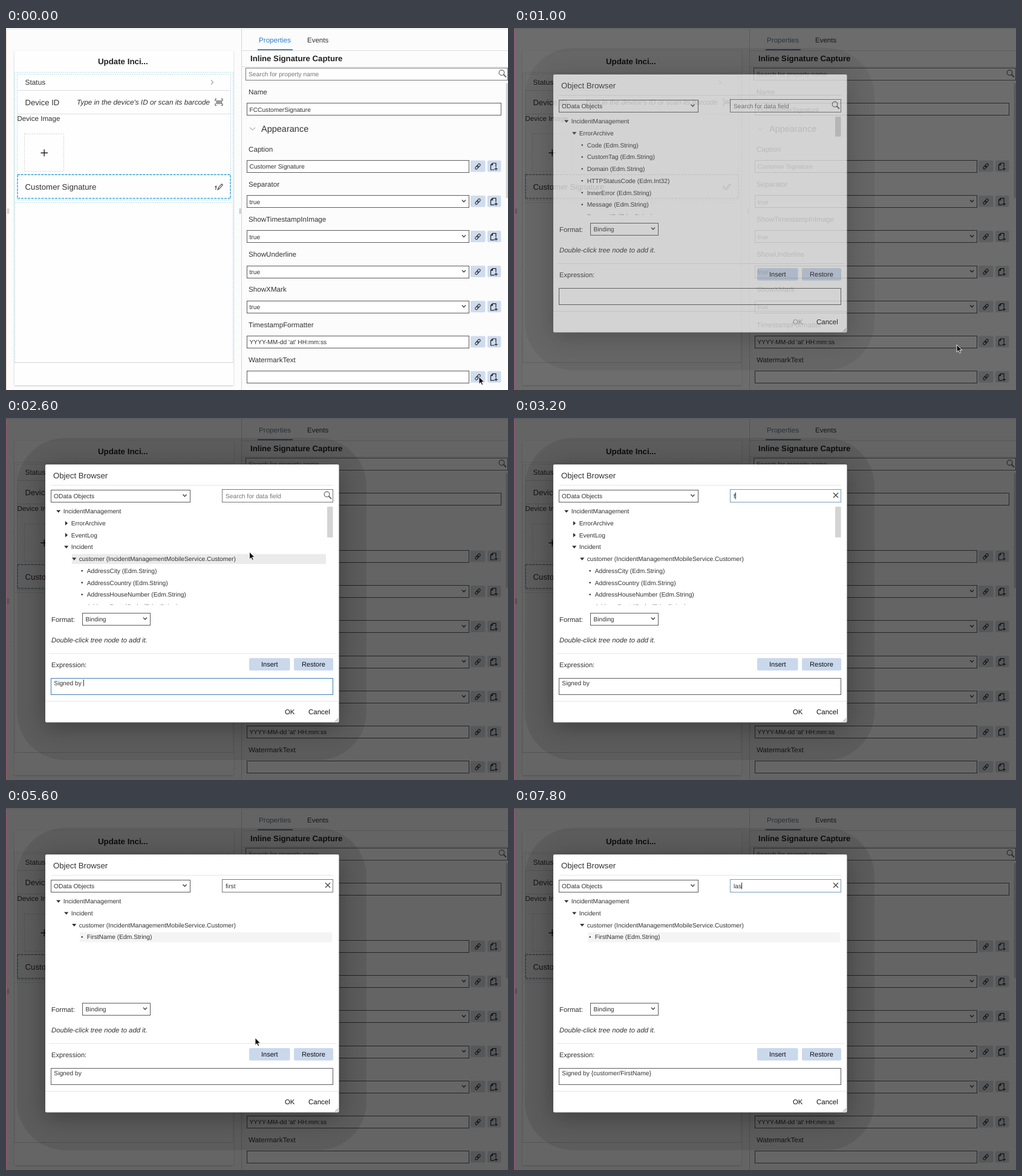
Write an HTML page that moves like this. It is 830x600 px and loops after 8 s.

```html
<!DOCTYPE html>
<html lang="en">
<head>
<meta charset="utf-8">
<title>Object browser</title>
<style>
  html, body { margin: 0; width: 100%; height: 100%; overflow: hidden; background: #fcfcfc; }
  svg { display: block; width: 830px; height: 600px; }
  text { font-family: "Liberation Sans", Arial, sans-serif; white-space: pre; text-rendering: geometricPrecision; }
  .muted { filter: saturate(.25); }
</style>
</head>
<body>
<svg id="stage" viewBox="0 0 830 600">
  <defs>
    <filter id="blur" x="-30%" y="-30%" width="160%" height="160%"><feGaussianBlur stdDeviation="20"/></filter>
    <filter id="soft"><feGaussianBlur stdDeviation="1.6"/></filter>
    <clipPath id="treeClip"><rect x="70" y="145" width="475" height="164.5"/></clipPath>
  </defs>
  <g id="page"></g>
  <rect id="dim" width="830" height="600"/>
  <path id="edge" d="M.5 2V600" stroke-width="1"/>
  <g id="modal"></g>
  <g id="cursor"></g>
</svg>
<script>
const $ = id => document.getElementById(id);
const LOOP = 8000, STEP = 200, SMALL = 10.25;

// y is the middle of the capital letters
const text = (x, y, size, str, fill = '#333', extra = '') =>
  `<text x="${x}" y="${y + size * .36}" font-size="${size}" fill="${fill}" ${extra}>${str}</text>`;
const box = (x, y, w, h, fill = '#fff', stroke = 'none', extra = '') =>
  `<rect x="${x}" y="${y}" width="${w}" height="${h}" fill="${fill}" stroke="${stroke}" ${extra}/>`;
const path = (d, stroke = '#444', width = 1, extra = '') =>
  `<path d="${d}" fill="none" stroke="${stroke}" stroke-width="${width}" ${extra}/>`;
const at = (x, y, content, more = '') => `<g transform="translate(${x} ${y})${more}">${content}</g>`;
const BOLD = 'font-weight="700"', ITALIC = 'font-style="italic"', MIDDLE = 'text-anchor="middle"';

const field = (x, y, w, h = 20, stroke = '#5c5c5c') => box(x + .5, y + .5, w - 1, h - 1, '#fff', stroke);
const caretDown = (x, y) => path(`M${x - 3} ${y - 1.7}l3 3.2 3-3.2`, '#444', 1.4);
const magnifier = (x, y) =>
  `<circle cx="${x}" cy="${y}" r="4.3" fill="none" stroke="#666" stroke-width="1.2"/>` +
  path(`M${x + 3} ${y + 3}l4.5 4.5`, '#666', 1.8);

function linkIcon(x, y, color) {
  const ring = cx => box(cx, -1.9, 6.4, 3.8, 'none', color, 'rx="1.9" stroke-width="1.1"');
  return at(x, y, ring(-5.4) + ring(-1), ' rotate(-48)');
}
function addIcon(x, y) {
  return at(x, y, path('M1.5 5.5H-4.5V-2.5L-1.5-5.5H4V.5M-1.5-5.5V-2.5H-4.5M1.5 4H7M4.2 1.3V6.7', '#222', 1.2));
}
function buttons(y, hot) {
  return box(768, y - 10, 24.5, 19, hot ? '#1870c5' : '#cfdcef', 'none', 'rx="2"') +
    linkIcon(780, y, hot ? '#fff' : '#333') +
    box(796, y - 10, 22.5, 19, '#cfdcef', 'none', 'rx="2"') + addIcon(806, y);
}

function phone() {
  const blue = '#b5dcec', rule = '#dedede';
  let bars = '';
  for (let i = 0; i < 6; i++) bars += `M${-4 + i * 1.7} -3.2V3.2`;
  return box(14, 39, 362, 554, '#aaa', 'none', 'filter="url(#soft)" opacity=".65"') +
    box(14, 38, 362, 554, '#fefefe') +
    text(193.3, 55.6, 13.3, 'Update Inci...', '#222', `${BOLD} ${MIDDLE}`) +
    path('M14.5 554V73.5H375.5V554M14.5 289.5H375.5', blue, 1, 'stroke-dasharray="2 1.5"') +
    path('M18.5 285.5V76.5H371.5V285.5Z', blue, 1, 'stroke-dasharray="2 1.5"') +
    path('M19 103.5H371M19 142.5H371', rule) + path('M14 554.5H376', '#d5d5d5') +
    text(31.5, 90, 11.9, 'Status') + path('M339 86.5l3.6 3.5-3.6 3.5', '#666') +
    text(31.5, 123, 13.1, 'Device ID') +
    text(117, 123, 11.75, "Type in the device's ID or scan its barcode", '#333', ITALIC) +
    at(352, 123, path(bars, '#444', .9) + path('M-4-5.5H-6V-2M4-5.5H6V-2M-4 5.5H-6V2M4 5.5H6V2', '#444', 1)) +
    text(18.5, 150, 11.6, 'Device Image') +
    box(30.5, 175.5, 65, 62, '#fefefe', '#cfcfcf', 'stroke-dasharray="2 2"') +
    path('M57.5 207H69M63.2 201.3V212.7', '#222', 1.4) +
    box(19, 243, 352, 39.5, '#fefefe', '#62b9df', 'stroke-width="1.8" stroke-dasharray="4 1.6"') +
    text(31.5, 263, 13.25, 'Customer Signature') +
    path('M350 268l1.2-3.3 5.3-6.2 1.8 1.6-5.4 6.2zM345.5 263.5l2-1.5v2.5l-1 3.5', '#444', 1.1);
}

const PROPS = [
  ['Caption', 'Customer Signature'], ['Separator', 'true'], ['ShowTimestampInImage', 'true'],
  ['ShowUnderline', 'true'], ['ShowXMark', 'true'],
  ['TimestampFormatter', "YYYY-MM-dd 'at' HH:mm:ss"], ['WatermarkText', '']
];

function panel(hot) {
  const rows = PROPS.map(([label, value], i) => {
    const y = 229.5 + i * 58.2;
    return text(401, y - 29, 11.65, label) + field(398, Math.floor(y - 10), 368, 21) +
      text(402.5, y + .3, 10.25, value) + (value === 'true' ? caretDown(757, y - 1) : '') +
      buttons(y, hot && i === PROPS.length - 1);
  }).join('');
  return path('M389.5 2V600', '#d6d6d6') +
    text(418, 20.3, 11.65, 'Properties', '#2f80cc') + text(498, 20.3, 11.5, 'Events') +
    path('M390 37.5H830M390 64.5H830', '#dcdcdc') + path('M416 36H474', '#5d7e9d', 2) +
    text(404, 50.6, 13.2, 'Inline Signature Capture', '#222', BOLD) +
    field(396, 66, 434, 21, '#777') + text(401, 76.7, SMALL, 'Search for property name', '#757575') +
    magnifier(819.5, 74) + box(826.5, 91, 3.5, 191, '#d3d3d3', 'none', 'rx="1.5"') +
    text(401, 106, 11.5, 'Name') + field(398, 124, 421, 21) + text(402.5, 135, 10.2, 'FCCustomerSignature') +
    path('M403 165l4.5 4.2 4.5-4.2', '#888') + text(422, 167, 14.5, 'Appearance') + rows;
}

const page = hot => box(0, 0, 830, 600, '#fcfcfc') + path('M0 1.5H830', '#dfdfdf') +
  phone() + panel(hot) + path('M2.5 299V308M4.5 299V308M386.5 299V308M388 299V308', '#b5b5b5');

// Tree rows: [level, kind, label]; kind o = open, c = closed, b = leaf
const leaf = level => name => [level, 'b', `${name} (Edm.${name === 'HTTPStatusCode' ? 'Int32' : 'String'})`];
const ROOT = [0, 'o', 'IncidentManagement'];
const CUSTOMER = [2, 'o', 'customer (IncidentManagementMobileService.Customer)'];
const TREES = {
  start: [ROOT, [1, 'o', 'ErrorArchive'],
    ...['Code', 'CustomTag', 'Domain', 'HTTPStatusCode', 'InnerError', 'Message', 'RequestID'].map(leaf(2))],
  customer: [ROOT, [1, 'c', 'ErrorArchive'], [1, 'c', 'EventLog'], [1, 'o', 'Incident'], CUSTOMER,
    ...['AddressCity', 'AddressCountry', 'AddressHouseNumber', 'AddressPostalCode'].map(leaf(3))],
  found: [ROOT, [1, 'o', 'Incident'], CUSTOMER, leaf(3)('FirstName')]
};
const MARKS = {
  o: '<path d="M-3.6-2H3.6L0 2.4Z" fill="#333"/>',
  c: '<path d="M-1.8-3.6V3.6L2.4 0Z" fill="#333"/>',
  b: '<circle r="1.3" fill="#333"/>'
};
const tree = rows => rows.map(([level, kind, label], i) => {
  const x = 94.7 + level * 13, y = 154.7 + i * 19.7;
  return at(x - 8, y, MARKS[kind]) + text(x, y, SMALL, label);
}).join('');

const pen = document.createElement('canvas').getContext('2d');
pen.font = `${SMALL}px "Liberation Sans", Arial, sans-serif`;
const widthOf = str => pen.measureText(str).width;
const caret = (x, y, str) => path(`M${x + widthOf(str) + .5} ${y - 5.5}v11`, '#222');

function button(x, w, label, hot) {
  return box(x, 398, w, 20.5, hot ? '#1870c5' : '#cad8ec', 'none', 'rx="2"') +
    text(x + w / 2, 408.3, 11.1, label, hot ? '#fff' : '#111', MIDDLE);
}

function modal(s) {
  const searching = s.focus === 'search', writing = s.focus === 'expression';
  return box(18, 33, 578, 534, '#000', 'none', 'rx="80" opacity=".09"') +
    box(65, 85, 485, 427, '#000', 'none', 'filter="url(#blur)" opacity=".32"') +
    box(65, 77, 485.5, 427.5, '#fff', 'none', 'rx="2"') +
    text(78, 95.2, 13.2, 'Object Browser') +
    path('M75 111.5H541M72 390.5H546M65 469.5H550', '#e6e6e6') +
    field(74, 119, 231, 21) + text(79, 129.3, 10.25, 'OData Objects') + caretDown(295.5, 128.5) +
    field(357, 118, 184, 22, searching ? '#7d9bb5' : '#777') +
    (s.selected ? box(362.5, 122.5, widthOf(s.query) + 1, 13, '#b4d5fb') : '') +
    text(363, 129, SMALL, s.query || 'Search for data field', s.query ? '#333' : '#757575') +
    (searching && !s.selected ? caret(363, 129, s.query) : '') +
    (s.query ? path('M528 124l8 8M536 124l-8 8', '#444', 1.3) : magnifier(530.5, 126.5)) +
    (s.tree === 'customer' && s.hover ? box(109, 225.5, 420, 16.5, '#ebebeb') : '') +
    (s.tree === 'found' && s.hover ? box(122, 206, 417, 16.5, '#f4f4f4') : '') +
    `<g clip-path="url(#treeClip)">${tree(TREES[s.tree])}</g>` +
    (s.tree === 'found' ? '' : box(531, 147, 9.5, s.tree === 'start' ? 33 : 51, '#d4d4d4', 'none', 'rx="1"')) +
    text(75, 333.5, 11.3, 'Format:') + field(126, 323, 113, 21) + text(131.5, 333.8, 10.2, 'Binding') +
    caretDown(230, 332.5) +
    text(75, 368, 11.3, 'Double-click tree node to add it.', '#333', ITALIC) +
    text(75, 409, 11.15, 'Expression:') + button(402, 67.5, 'Insert', s.insertHot) + button(476, 65, 'Restore') +
    field(74, 431, 467, 28, writing ? '#3f7cb5' : '#5c5c5c') + text(79.3, 439.3, SMALL, s.expression) +
    (writing ? caret(79.3, 439, s.expression) : '') +
    text(461, 487.3, 11.3, 'OK', s.expression ? '#111' : '#999') + text(500, 487.3, 11.5, 'Cancel', '#111') +
    path('M544 503.5l5.5-5.5M547 503.5l2.5-2.5', '#777');
}

const POINTERS = {
  arrow: '<path d="M0 0V12.2L2.8 9.6 4.7 13.7 6.7 12.8 4.9 8.8H8.7Z" fill="#111" stroke="#fff" stroke-width=".9"/>',
  hand: '<path d="M-1 0Q.3-1 1.2 .3L2 4 6.5 5.2Q8 6 7.5 8L6.4 12H.8L-2.7 7.6Q-3-.8 -1 6L0 7Z" fill="#fff" stroke="#111"/>',
  beam: path('M-2-6Q0-6 0-4.5V4.5Q0 6-2 6M2-6Q0-6 0-4.5M0 4.5Q0 6 2 6', '#222', 1)
};

// Each track holds its value until the next entry
const TRACKS = {
  pointer: [[0, ['arrow', 782, 578]], [200, ['hand', 782, 580]], [1000, ['arrow', 732, 525]],
    [1200, ['beam', 300, 446]], [1600, null], [2600, ['arrow', 402.5, 222]], [2800, ['arrow', 412, 165]],
    [3000, ['beam', 420, 130]], [3200, null], [4400, ['beam', 400, 136]], [4600, ['arrow', 320, 180]],
    [4800, ['arrow', 235, 214]], [5400, ['arrow', 310, 285]], [5600, ['arrow', 412, 381]],
    [5800, ['hand', 434, 407]], [6400, ['arrow', 428, 290]], [6600, ['beam', 402, 131]], [7200, null]],
  linkHot: [[0, false], [200, true], [1000, false]],
  shown: [[0, 0], [1000, .7], [1200, 1]],
  dim: [[0, 0], [1000, .57], [1200, .6]],
  tree: [[0, 'start'], [2600, 'customer'], [3800, 'found']],
  hover: [[0, false], [2600, true], [2800, false], [4800, true]],
  focus: [[0, ''], [1600, 'expression'], [3000, 'search'], [4800, ''], [6800, 'search']],
  expression: [[0, ''], [1600, 'Sig'], [1800, 'Signed'], [2000, 'Signed by '],
    [6000, 'Signed by {customer/FirstName}']],
  query: [[0, ''], [3200, 'f'], [3400, 'fi'], [3600, 'fir'], [3800, 'firs'], [4000, 'first'],
    [7400, 'l'], [7600, 'la'], [7800, 'las']],
  selected: [[0, false], [6800, true], [7400, false]],
  insertHot: [[0, false], [5800, true], [6400, false]]
};
const valueAt = (track, t) => track.filter(([start]) => start <= t).pop()[1];

let lastStep = -1, lastHot = null;
function draw(now) {
  const t = Math.floor(now % LOOP / STEP) * STEP;
  requestAnimationFrame(draw);
  if (t === lastStep) return;
  lastStep = t;
  const s = {};
  for (const key in TRACKS) s[key] = valueAt(TRACKS[key], t);
  if (s.linkHot !== lastHot) $('page').innerHTML = page(lastHot = s.linkHot);
  $('page').setAttribute('class', s.shown ? 'muted' : '');
  $('dim').setAttribute('opacity', s.dim);
  $('edge').setAttribute('stroke', s.shown ? '#a0586c' : '#efcfc6');
  $('modal').setAttribute('opacity', s.shown);
  $('modal').innerHTML = s.shown ? modal(s) : '';
  $('cursor').innerHTML = s.pointer ? at(s.pointer[1], s.pointer[2], POINTERS[s.pointer[0]]) : '';
}
draw(performance.now());
</script>
</body>
</html>
```
